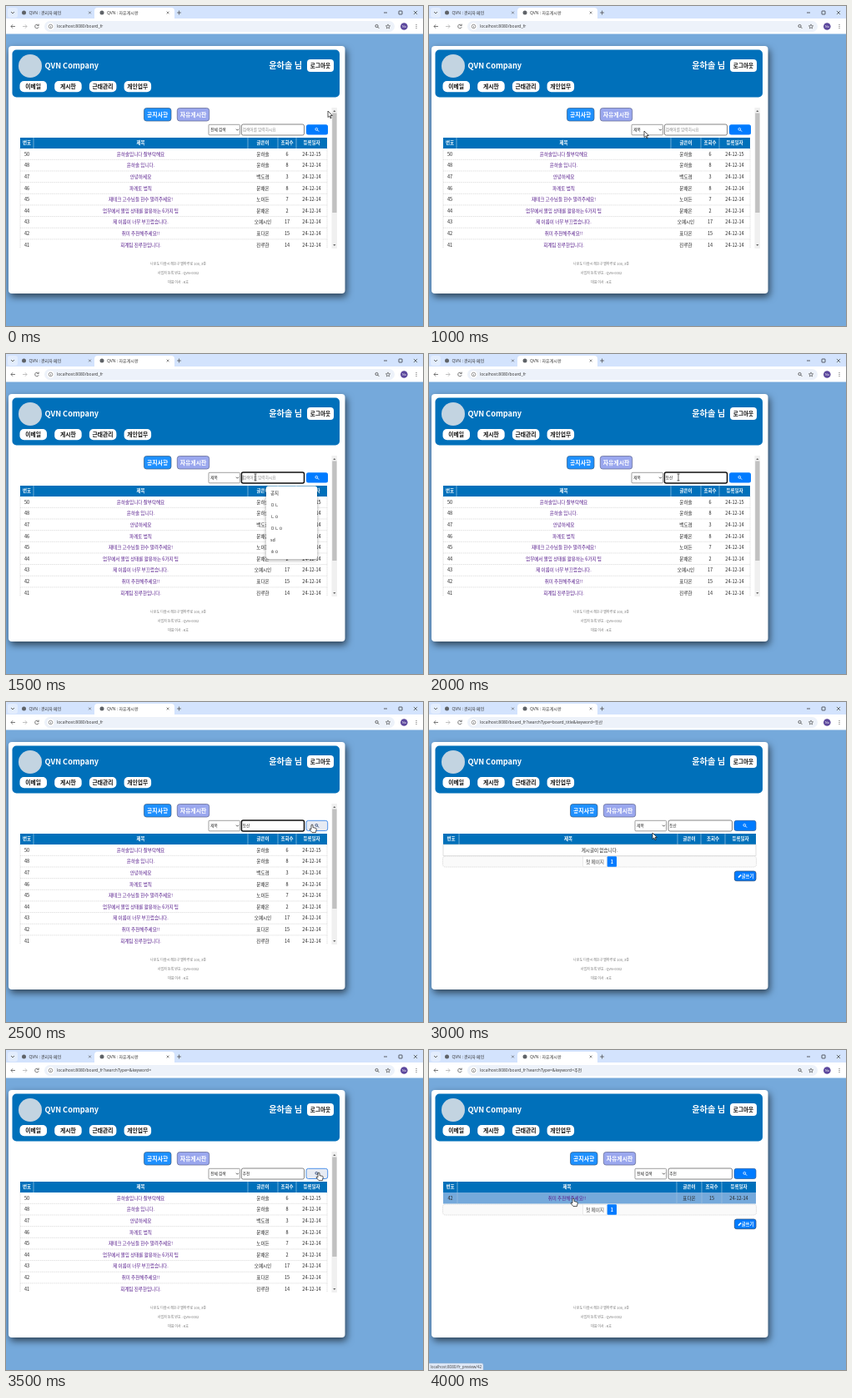
An HTML page with a canvas that plays this animation: 500x384 px, repeating every 4.5 s.

```html
<!DOCTYPE html>
<html lang="ko">
<head>
<meta charset="utf-8">
<title>자유게시판</title>
<style>
html, body { margin: 0; width: 100%; height: 100%; overflow: hidden; background: #75a9db; }
canvas { display: block; width: 500px; height: 384px; }
</style>
</head>
<body>
<canvas id="stage"></canvas>
<script>
const canvas = document.getElementById('stage');
const ctx = canvas.getContext('2d');
const dpr = window.devicePixelRatio || 1;
canvas.width = 500 * dpr;
canvas.height = 384 * dpr;

const KR = '"Noto Sans CJK KR", "Noto Sans CJK", sans-serif';
const UI = '"Open Sans", "Noto Sans CJK KR", sans-serif';
const SKY = '#75a9db', NAVY = '#0070ba', BLUE = '#007bff', INK = '#222', LINK = '#551a8b';
const STEP = 500, ROW = 13.65;

const posts = [
  [50, '윤하솔입니다 잘부탁해요', '윤하솔', 6, '24-12-15'],
  [48, '윤하솔 입니다.', '윤하솔', 8],
  [47, '안녕하세요', '백도겸', 3],
  [46, '파레토 법칙', '문채온', 8],
  [45, '재테크 고수님들 한수 알려주세요!', '노이든', 7],
  [44, '업무에서 몰입 상태를 활용하는 6가지 팁', '문채온', 2],
  [43, '제 이름이 너무 부끄럽습니다.', '오예시인', 17],
  [42, '취미 추천해주세요!!', '표다온', 15],
  [41, '회계팀 진루한입니다.', '진루한', 14]
];
const heads = ['번호', '제목', '글쓴이', '조회수', '등록일자'];
const fullCols = [17, 33, 290, 326, 348, 385];
const noneCols = [17, 36, 298, 326, 355, 392];
const oneCols = [17, 34, 297, 327, 351, 392];

const ALL = '전체 검색', TITLE = '제목';
const scenes = [
  { type: ALL, cursor: ['arrow', 386, 126] },
  { type: ALL, cursor: ['arrow', 264, 148] },
  { type: TITLE, cursor: ['arrow', 258, 150] },
  { type: TITLE, cursor: ['beam', 299, 148], focus: true, hints: true },
  { type: TITLE, cursor: ['beam', 299, 148], focus: true, word: '등산' },
  { type: TITLE, cursor: ['hand', 367, 147], focus: true, word: '등산', hover: true },
  { type: TITLE, cursor: ['arrow', 268, 157], word: '등산', result: 'none',
    query: '?searchType=board_title&keyword=등산' },
  { type: ALL, cursor: ['hand', 375, 147], word: '추천', hover: true,
    query: '?searchType=&keyword=' },
  { type: ALL, cursor: ['hand', 173, 178], word: '추천', result: 'one',
    query: '?searchType=&keyword=추천' }
];

function text(s, x, y, size, color = INK, align = 'center', weight = 400, family = KR) {
  ctx.font = `${weight} ${size}px ${family}`;
  ctx.textAlign = align;
  ctx.fillStyle = color;
  ctx.fillText(s, x, y + size * 0.37);
}

function box(x, y, r, b, radius, fill, stroke, width = 0.7) {
  ctx.beginPath();
  ctx.roundRect(x, y, r - x, b - y, radius);
  if (fill) { ctx.fillStyle = fill; ctx.fill(); }
  if (stroke) { ctx.strokeStyle = stroke; ctx.lineWidth = width; ctx.stroke(); }
}

function line(points, color = '#444', width = 0.7) {
  ctx.beginPath();
  points.forEach(([x, y]) => ctx.lineTo(x, y));
  ctx.strokeStyle = color;
  ctx.lineWidth = width;
  ctx.stroke();
}

function disc(x, y, r, fill, stroke, width = 0.7) {
  ctx.beginPath();
  ctx.arc(x, y, r, 0, Math.PI * 2);
  if (fill) { ctx.fillStyle = fill; ctx.fill(); }
  if (stroke) { ctx.strokeStyle = stroke; ctx.lineWidth = width; ctx.stroke(); }
}

function shadow(color, blur, dx, dy) {
  ctx.shadowColor = color;
  ctx.shadowBlur = blur * dpr;
  ctx.shadowOffsetX = dx * dpr;
  ctx.shadowOffsetY = dy * dpr;
}

function lens(x, y, color, r = 1.6) {
  disc(x - 0.5, y - 0.5, r, null, color, 0.8);
  line([[x + 0.6, y + 0.6], [x + 2.3, y + 2.3]], color, 0.9);
}

function cross(x, y, r, color) {
  line([[x - r, y - r], [x + r, y + r]], color, 0.6);
  line([[x - r, y + r], [x + r, y - r]], color, 0.6);
}

function tab(x, label) {
  disc(x, 8, 2.5, '#5f6368');
  text(label, x + 6, 8, 5, '#333', 'left', 400, UI);
  cross(x + 79, 8, 1.4, '#444');
}

function browser(scene) {
  ctx.fillStyle = '#d3e3fd';
  ctx.fillRect(0, 0, 500, 16);
  box(2, 2, 14, 14, 3, '#e3edfd');
  line([[6, 7], [8, 9], [10, 7]], '#333');
  box(106, 2, 202, 19, 4, '#fff');
  ctx.fillStyle = '#fff';
  ctx.fillRect(0, 15, 500, 18.5);
  tab(21.5, 'QVN : 관리자 메인');
  tab(115, 'QVN : 자유게시판');
  line([[205, 8], [210, 8]]);
  line([[207.5, 5.5], [207.5, 10.5]]);
  line([[453, 8], [457, 8]], '#222');
  box(471, 6, 475, 10, 0.5, null, '#222');
  cross(491, 8, 2.1, '#222');

  line([[11, 24.5], [6, 24.5]]);
  line([[8, 22.3], [6, 24.5], [8, 26.7]]);
  line([[20, 24.5], [25, 24.5]], '#aaa');
  line([[23, 22.3], [25, 24.5], [23, 26.7]], '#aaa');
  ctx.beginPath();
  ctx.arc(37, 24.5, 2.3, 0.3, 5.4);
  ctx.strokeStyle = '#444';
  ctx.stroke();
  line([[39.2, 21.6], [39.2, 23.6], [37.2, 23.6]]);

  box(46, 18, 466, 31, 6.5, '#edf2fa');
  disc(53.5, 24.5, 4.2, '#fff');
  disc(53.5, 24.5, 2.3, null, '#555', 0.6);
  line([[53.5, 24], [53.5, 25.8]], '#555', 0.6);
  text('localhost:8080/board_fr' + (scene.query || ''), 61, 24.5, 5, '#333', 'left', 400, UI);
  lens(445, 24.5, '#444');
  const star = [];
  for (let i = 0; i <= 10; i++) {
    const a = i * Math.PI / 5 - Math.PI / 2, r = i % 2 ? 1.2 : 2.8;
    star.push([458 + r * Math.cos(a), 24.7 + r * Math.sin(a)]);
  }
  line(star, '#444', 0.6);
  disc(477.3, 24.5, 4.3, '#5b479c');
  text('Na', 477.3, 24.5, 3.6, '#fff', 'center', 400, UI);
  [22.5, 24.5, 26.5].forEach(y => disc(492, y, 0.55, '#444'));
}

function frameCard() {
  ctx.save();
  shadow('rgba(0,0,0,.6)', 9, 2, 4);
  box(3, 48, 406.5, 345, 4, '#fff');
  ctx.restore();
  box(7.5, 52.5, 400, 109.5, 5, NAVY);
  disc(29, 72, 14, '#c3d4e1');
  text('QVN Company', 46.5, 72, 9.2, '#fff', 'left', 700);
  text('윤하솔 님', 355, 71.5, 10.2, '#fff', 'right', 700);
  box(361, 64, 393, 79, 4, '#fff');
  text('로그아웃', 377, 71.7, 6.6, '#111', 'center', 700);
  ['이메일', '게시판', '근태관리', '개인업무'].forEach((s, i) => {
    const x = 16.5 + i * 41.7;
    box(x, 90, x + 32.5, 103.3, 5, '#fff');
    text(s, x + 16.2, 96.6, 6.8, '#111', 'center', 700);
  });
  const gray = '#777';
  text('나온도 다솔시 해든구 별마루로 100, 3층', 206.5, 310, 4.05, gray);
  text('사업자 등록 번호 : QVN-0002', 206.5, 320.8, 4.05, gray);
  text('대표 이사 : K호', 206.5, 331.5, 4.05, gray);
}

function searchBar(scene) {
  const d = scene.result ? 4 : 0, w = scene.result ? 2 : 0;
  box(165.5 + d, 122.5, 198 + d, 138, 3, '#1e90ff', '#34597f');
  text('공지사항', 181.7 + d, 130.2, 6.9, '#fff', 'center', 700);
  box(205.3 + d, 122.5, 243.7 + d, 138, 3, '#9aa7ee', '#5c648f');
  text('자유게시판', 224.5 + d, 130.2, 6.9, '#fff', 'center', 700);

  box(243 + d, 142.3, 280.5 + d, 154.8, 1, '#fff', '#777');
  text(scene.type, 245.3 + d, 148.5, 4.7, INK, 'left');
  line([[276 + d, 147.7], [277.5 + d, 149.2], [279 + d, 147.7]], '#222', 0.8);

  const left = 282.4 + d + (w ? 0.6 : 0), right = 357.5 + d + w;
  box(left, 142, right, 155, 2, '#fff', scene.focus ? '#111' : '#666', scene.focus ? 1.5 : 0.8);
  text(scene.word || '검색어를 입력하시요', left + 1.3, 148.5, 4.7, scene.word ? INK : '#888', 'left');
  if (scene.focus && !scene.word) line([[284, 145.5], [284, 151.5]], '#222', 0.5);

  const bx = 360 + d + w;
  if (scene.hover) box(bx, 142.3, bx + 25.7, 154.5, 2.5, '#e7ebf3', '#3c86e8', 0.9);
  else box(bx, 142.3, bx + 26, 154.5, 2.5, BLUE, scene.result && '#2c5f9d');
  lens(bx + 12.8, 148.3, scene.hover ? '#223b6b' : '#fff', 1.4);
}

function center(cols, i) {
  return (cols[i] + cols[i + 1]) / 2;
}

function tableHead(cols) {
  box(17, 158, cols[5], 171, 0, NAVY);
  heads.forEach((s, i) => {
    text(s, center(cols, i), 164.4, 5.5, '#fff', 'center', 700);
    if (i) line([[cols[i], 158], [cols[i], 171]], '#b9d5ea', 0.6);
  });
}

function postRow([id, title, author, views, date = '24-12-14'], cols, y) {
  [id, title, author, views, date].forEach((s, i) =>
    text(s, center(cols, i), y, 5.55, i === 1 ? LINK : INK));
}

function dashed(points) {
  ctx.setLineDash([1.4, 1]);
  line(points, '#c8c8c8', 0.6);
  ctx.setLineDash([]);
}

function fullList() {
  ctx.save();
  ctx.beginPath();
  ctx.rect(16, 157, 371, 134);
  ctx.clip();
  tableHead(fullCols);
  posts.forEach((p, i) => {
    const y = 177.5 + i * ROW;
    postRow(p, fullCols, y);
    dashed([[17, y + ROW / 2], [385, y + ROW / 2]]);
  });
  dashed([[17, 171], [17, 291]]);
  dashed([[385, 171], [385, 291]]);
  ctx.restore();

  box(390.5, 122, 397, 291, 0, '#f0f0f0');
  box(391.2, 128.5, 396.5, 248, 0, '#c1c1c1');
  ctx.fillStyle = '#666';
  [[127, -2], [286, 2]].forEach(([y, h]) => {
    ctx.beginPath();
    ctx.moveTo(392.2, y);
    ctx.lineTo(395.4, y);
    ctx.lineTo(393.8, y + h);
    ctx.fill();
  });
}

function results(kind) {
  const cols = kind === 'one' ? oneCols : noneCols;
  tableHead(cols);
  if (kind === 'one') {
    box(17, 171, 392, 184.6, 0, SKY);
    cols.slice(1, 5).forEach(x => line([[x, 171], [x, 184.6]], '#a9c5df', 0.5));
    postRow(posts[7], cols, 177.8);
  } else {
    box(17, 171, 392, 184.6, 0, null, '#ccc', 0.6);
    text('게시글이 없습니다.', 204.5, 177.8, 5.55);
  }
  ctx.setLineDash([1.4, 1]);
  box(16.5, 185, 392.5, 198, 3, '#fafafa', '#c4c4c4', 0.6);
  ctx.setLineDash([]);
  box(184.5, 185.3, 213, 197.8, 0, '#fff', '#ddd', 0.6);
  text('첫 페이지', 199, 191.6, 5.7, '#444');
  box(213.7, 185.2, 225, 197.8, 1, BLUE);
  text('1', 219.4, 191.5, 5.5, '#fff', 'center', 700);

  box(366.3, 203, 392, 214.7, 2.5, BLUE, '#2c4f7d', 0.8);
  line([[371, 210.6], [374.2, 207.4]], '#fff', 1.5);
  text('글쓰기', 382, 208.8, 5.3, '#fff', 'center', 700);
}

function hintPopup() {
  ctx.save();
  shadow('rgba(0,0,0,.35)', 4, 0, 1.5);
  box(312, 158.5, 373, 246, 2.5, '#fff');
  ctx.restore();
  ['공지', 'ㅁㄴ', 'ㄴㅇ', 'ㅁㄴㅇ', 'sd', 'ㅎㅇ'].forEach((s, i) =>
    text(s, 317, 167 + i * 14.1, 5.4, INK, 'left'));
}

const shapes = {
  arrow: 'M0 0V7.6L1.8 6L3 8.8L4.2 8.3L3 5.5H5.4Z',
  hand: 'M-1 0.6Q0 -0.6 1 0.6V3.6L4.6 4.4Q5.4 4.8 5.2 6L4.4 9.6H0L-3 6Q-3.2 4.6 -1 5.6Z'
};

function pointer([kind, x, y]) {
  if (kind === 'beam') {
    line([[x, y - 4], [x, y + 4]], '#222', 0.7);
    [-4, 4].forEach(d => line([[x - 1.5, y + d], [x + 1.5, y + d]], '#222', 0.7));
    return;
  }
  ctx.save();
  ctx.translate(x, y);
  const path = new Path2D(shapes[kind]);
  ctx.fillStyle = '#fff';
  ctx.strokeStyle = '#111';
  ctx.lineWidth = 0.7;
  ctx.fill(path);
  ctx.stroke(path);
  ctx.restore();
}

function draw(scene) {
  ctx.setTransform(dpr, 0, 0, dpr, 0, 0);
  ctx.fillStyle = SKY;
  ctx.fillRect(0, 0, 500, 384);
  browser(scene);
  frameCard();
  searchBar(scene);
  if (scene.result) results(scene.result);
  else fullList();
  if (scene.hints) hintPopup();
  if (scene.result === 'one') {
    box(-2, 376, 65, 386, 2, '#dfe9f8', '#a9bdd6', 0.5);
    text('localhost:8080/fr_preview/42', 1.5, 380.2, 4.6, '#444', 'left', 400, UI);
  }
  pointer(scene.cursor);
}

const start = performance.now();
function tick() {
  const t = Math.max(0, performance.now() - start);
  draw(scenes[Math.floor(t / STEP) % scenes.length]);
  requestAnimationFrame(tick);
}
tick();
</script>
</body>
</html>
```
